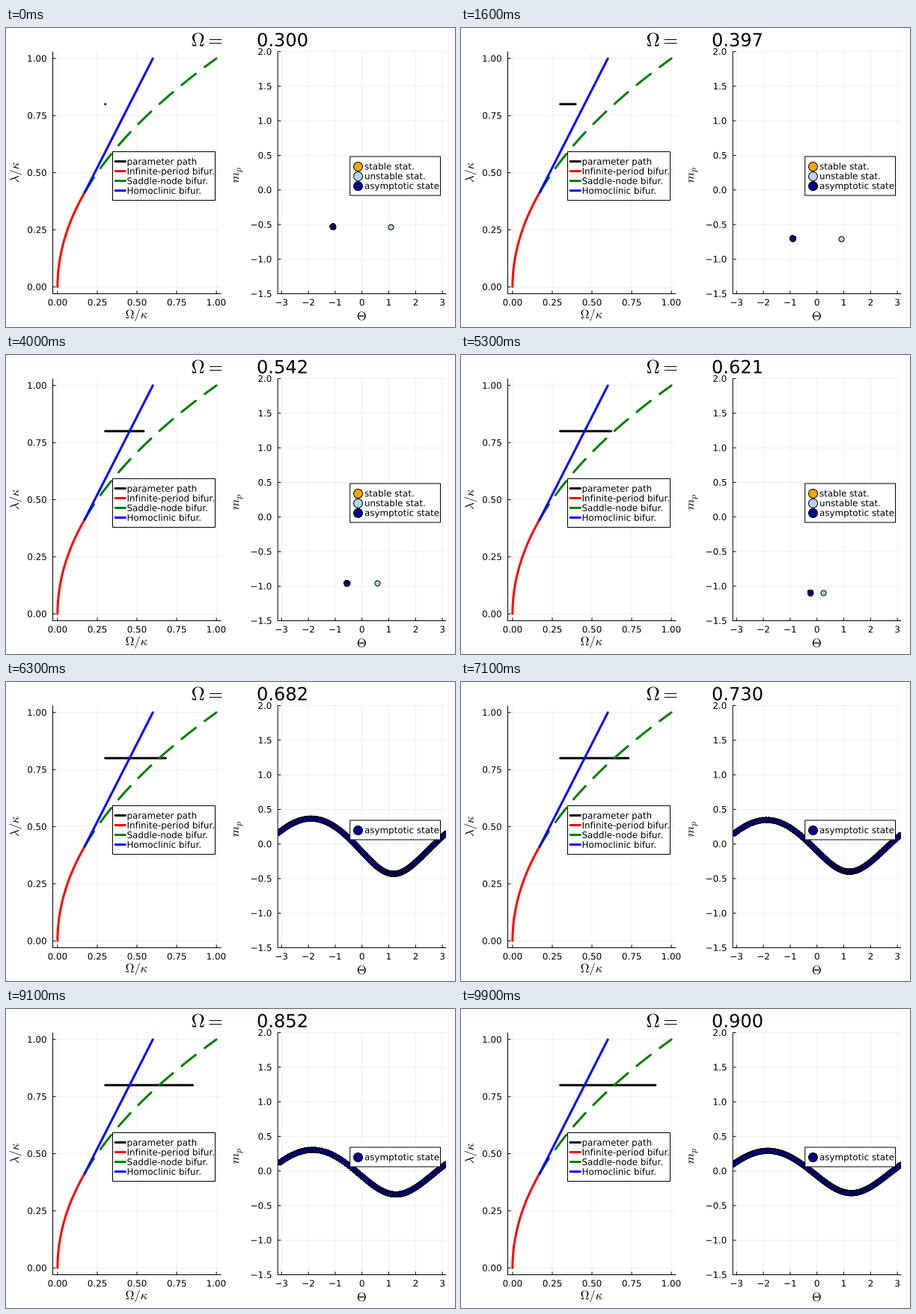
A matplotlib script that plays this animation: 600x400 px, repeating every 10000 ms.

```python
import numpy as np
import matplotlib.pyplot as plt
from matplotlib.animation import FuncAnimation
from matplotlib.patches import PathPatch, Rectangle
from matplotlib.textpath import TextPath
from matplotlib.transforms import Affine2D

plt.rcParams.update({"font.family": "DejaVu Sans", "mathtext.fontset": "cm",
                     "path.snap": False, "lines.solid_capstyle": "round"})

W, H, DPI = 600, 400, 100
PX = 72 / DPI                     # points per pixel
FRAMES, INTERVAL = 100, 100
LAM = 0.8                         # coupling held fixed along the path
OMEGAS = np.linspace(0.3, 0.9, FRAMES)
OM_C = 0.17                       # where the three bifurcation lines meet
N_DOTS = 400
NAVY, SKY = "#00008b", "#add8e6"

fig = plt.figure(figsize=(W / DPI, H / DPI), dpi=DPI, facecolor="white")
ax = fig.add_axes([0, 0, 1, 1])
ax.set_xlim(0, W)
ax.set_ylim(H, 0)
ax.axis("off")


def outline(x, y, s, size=11.9, ha="left", va="baseline", rotation=0):
    """Glyph outlines of s placed at a sub-pixel stage position."""
    path = TextPath((0, 0), s, size=size)
    path = Affine2D().rotate_deg(rotation).scale(1, -1).transform_path(path)
    box = path.get_extents()
    dx = {"left": 0, "center": (box.x0 + box.x1) / 2, "right": box.x1}[ha]
    dy = {"baseline": 0, "center": (box.y0 + box.y1) / 2}[va]
    return Affine2D().translate(x - dx, y - dy).transform_path(path)


def text(x, y, s, size=11.9, zorder=3, **kw):
    return ax.add_patch(PathPatch(outline(x, y, s, size, **kw),
                                  fc="black", lw=0, zorder=zorder))


def line(xs, ys, color="black", width=1, **kw):
    return ax.plot(xs, ys, color=color, lw=width * PX, **kw)[0]


def dots(xs, ys, color, diameter, z):
    sizes = np.full(len(xs), (diameter * PX) ** 2)
    return ax.scatter(xs, ys, s=sizes, c=color, edgecolors="black",
                      linewidths=PX, zorder=z)


class Panel:
    """Plot area that maps data values to stage pixels."""

    def __init__(self, left, right, top, bottom, xlim, ylim):
        self.box = left, right, top, bottom
        self.xlim, self.ylim = xlim, ylim

    def x(self, v):
        l, r, _, _ = self.box
        return l + (np.asarray(v) - self.xlim[0]) / (self.xlim[1] - self.xlim[0]) * (r - l)

    def y(self, v):
        _, _, t, b = self.box
        return b - (np.asarray(v) - self.ylim[0]) / (self.ylim[1] - self.ylim[0]) * (b - t)

    def frame(self, xticks, yticks, xfmt, yfmt):
        l, r, t, b = self.box
        grid = dict(color="black", width=0.6, alpha=0.1, zorder=0)
        edge = dict(zorder=1, solid_capstyle="butt")
        for v in xticks:
            px = self.x(v)
            line([px, px], [t, b], **grid)
            line([px, px], [b, b - 4], **edge)
            text(px, 371.3, xfmt(v), ha="center")
        for v in yticks:
            py = self.y(v)
            line([l, r], [py, py], **grid)
            line([l, l + 4], [py, py], **edge)
            text(l - 8.7, py + 4.3, yfmt(v), ha="right")
        line([l, l], [t, b + 0.5], **edge)
        line([l, r], [b, b], **edge)

    def clip(self, artist):
        l, r, t, b = self.box
        artist.set_clip_path(Rectangle((l, t), r - l, b - t, transform=ax.transData))


def legend_box(left, top, right, bottom):
    return ax.add_patch(Rectangle((left, top), right - left, bottom - top,
                                  fc="white", ec="black", lw=PX, zorder=6))


def number(fmt):
    return lambda v: format(v, fmt).replace("-", "\u2212")


def running_orbits(omega, dt=0.03, skip=500):
    """Late-time points (theta, m) of the running state, one row per omega."""
    def rate(s):
        th, m = s
        return np.array([4 * (omega + LAM * m / np.sqrt(2)),
                         -(m + np.sqrt(2) * LAM * np.cos(th))])

    s = np.zeros((2, len(omega)))
    out = []
    for i in range(skip + N_DOTS):
        k1 = rate(s)
        k2 = rate(s + dt / 2 * k1)
        k3 = rate(s + dt / 2 * k2)
        k4 = rate(s + dt * k3)
        s = s + dt / 6 * (k1 + 2 * k2 + 2 * k3 + k4)
        if i >= skip:
            out.append(s)
    th, m = np.array(out).transpose(1, 2, 0)
    return (th + np.pi) % (2 * np.pi) - np.pi, m


# Parameter plane
plane = Panel(62.5, 287.5, 31.6, 355.5, (-0.03, 1.03), (-0.03, 1.03))
quarters = np.arange(5) / 4
plane.frame(quarters, quarters, number(".2f"), number(".2f"))
text(174.5, 384.2, r"$\Omega/\kappa$", 16.5, ha="center", va="center")
text(12.7, 193, r"$\lambda/\kappa$", 16.5, ha="center", va="center", rotation=90)

path = line([], [], width=3, zorder=2)
lam_c = np.sqrt(OM_C)
low, high = np.linspace(0, lam_c, 80), np.linspace(lam_c, 1, 80)
line(plane.x(low ** 2), plane.y(low), "red", 3, zorder=3)
line(plane.x(high ** 2), plane.y(high), "green", 3, zorder=3,
     dashes=(8, 5), dash_capstyle="round")
line(plane.x([OM_C, 0.6]), plane.y([lam_c, 1]), "blue", 3, zorder=4)

PITCH, MIDDLE = 13, 198           # legend row height and centre line
legend_box(142.5, MIDDLE - 2.5 * PITCH, 279.5, MIDDLE + 2.5 * PITCH)
entries = [("parameter path", "black"), ("Infinite-period bifur.", "red"),
           ("Saddle-node bifur.", "green"), ("Homoclinic bifur.", "blue")]
for i, (label, color) in enumerate(entries):
    row = MIDDLE + (i - 1.5) * PITCH
    line([146, 159.5], [row, row], color, 3, zorder=7)
    text(161.5, row + 4.3, label, zorder=7)

# Phase space
phase = Panel(363.2, 588.2, 31.6, 355.5, (-np.pi, np.pi), (-1.5, 2))
phase.frame(range(-3, 4), np.arange(-1.5, 2.1, 0.5), number("d"), number(".1f"))
text(475.3, 385.3, r"$\Theta$", 16.5, ha="center", va="center")
text(310, 197, r"$m_p$", 16.5, ha="center", va="center", rotation=90)


def phase_legend(rows):
    half = (len(rows) + 1) / 2 * PITCH
    parts = [legend_box(459.7, MIDDLE - half, 580.5, MIDDLE + half)]
    for i, (label, color) in enumerate(rows):
        y = MIDDLE - half + (i + 1) * PITCH
        parts += [dots([469.7], [y], color, 12, 7),
                  text(479, y + 4.3, label, zorder=7)]
    return parts


full_legend = phase_legend([("stable stat.", "orange"), ("unstable stat.", SKY),
                            ("asymptotic state", NAVY)])
short_legend = phase_legend([("asymptotic state", NAVY)])

stable = dots([0], [0], "orange", 7, 3)
unstable = dots([0], [0], SKY, 7, 3)
state = dots(np.zeros(N_DOTS), np.zeros(N_DOTS), NAVY, 7, 4)
for artist in (stable, unstable, state):
    phase.clip(artist)

# Title
text(247.5, 24.4, r"$\Omega =$", 25.3)
readout = text(0, 0, "0")

locked = OMEGAS < LAM ** 2
first_run = int(locked.sum())
run_theta, run_m = running_orbits(OMEGAS[~locked])


def update(i):
    om = OMEGAS[i]
    readout.set_path(outline(335, 24.4, f"{om:.3f}", 24.1))
    path.set_data(plane.x([0.3, max(om, 0.301)]), plane.y([LAM, LAM]))
    fixed = bool(locked[i])
    if fixed:
        th = np.arccos(om / LAM ** 2)
        m = -np.sqrt(2) * om / LAM
        rest = [[phase.x(-th), phase.y(m)]]
        stable.set_offsets(rest)
        unstable.set_offsets([[phase.x(th), phase.y(m)]])
        state.set_offsets(np.repeat(rest, N_DOTS, axis=0))
    else:
        k = i - first_run
        state.set_offsets(np.column_stack([phase.x(run_theta[k]), phase.y(run_m[k])]))
    for artist in (stable, unstable, *full_legend):
        artist.set_visible(fixed)
    for artist in short_legend:
        artist.set_visible(not fixed)
    return []


anim = FuncAnimation(fig, update, frames=FRAMES, interval=INTERVAL,
                     init_func=lambda: update(0), repeat=True, blit=False)
plt.show()
```
